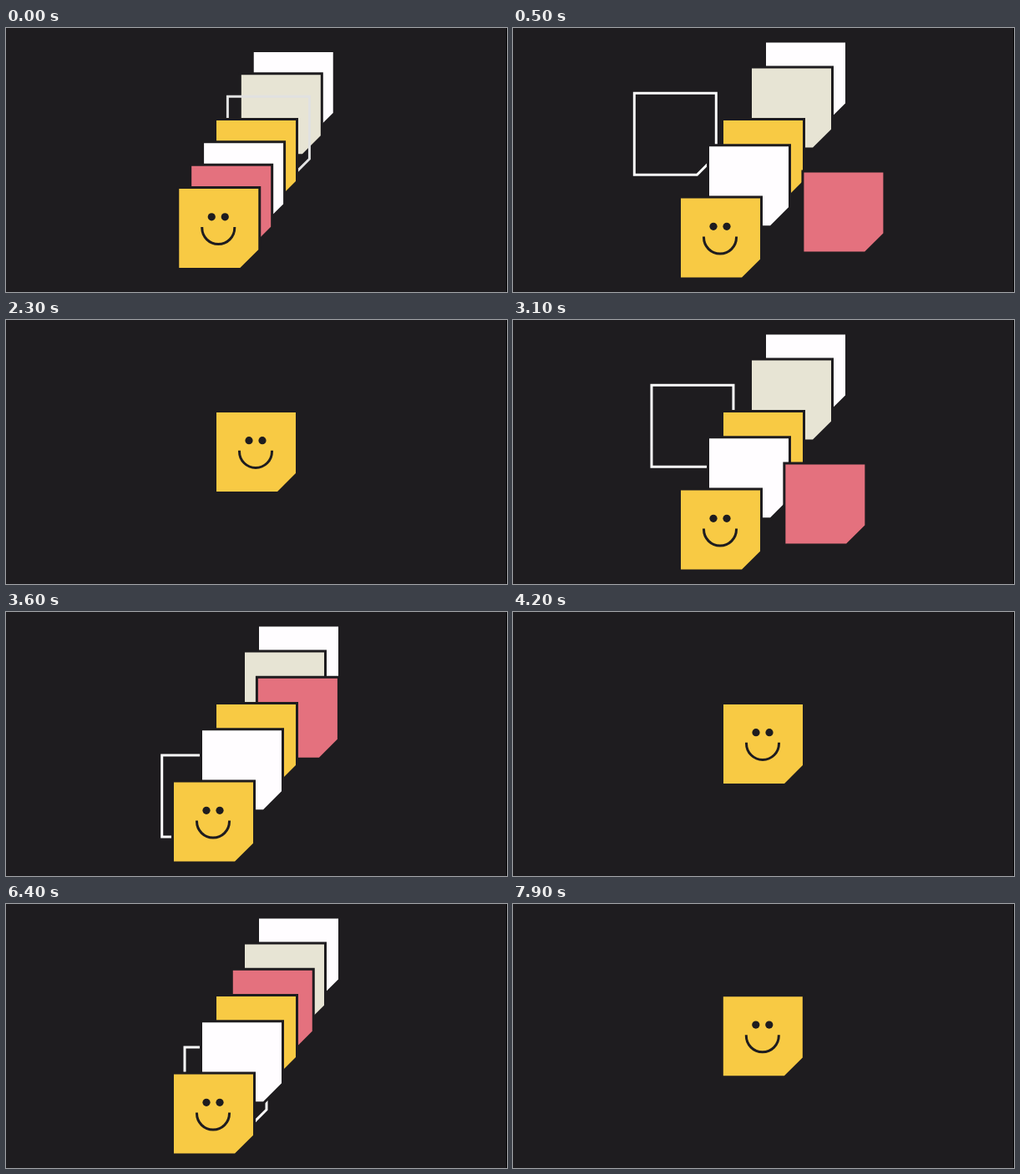
An HTML page with a canvas for the animation above (8000 ms loop, 600 px wide and 317 px high).

```html
<!DOCTYPE html>
<html lang="en">
<head>
<meta charset="utf-8">
<title>Sticky notes</title>
<style>
  html, body { margin: 0; width: 100%; height: 100%; overflow: hidden; background: #1e1c1f; }
  canvas { display: block; width: 600px; height: 317px; }
</style>
</head>
<body>
<canvas id="stage" width="600" height="317"></canvas>
<script>
const ctx = document.getElementById('stage').getContext('2d');
const INK = '#1e1c1f', YELLOW = '#f8ca44', PINK = '#e4717e', BEIGE = '#e7e4d4', WHITE = '#fffdff';
const LOOP = 8000, TICK = 100, CYCLE = 2701, LEAD = 216;
const HOME = { x: 252, y: 111 }, STEP = { x: 17, y: -31.2 };

// Note outline, 1.5px outside the 95px paper, with a clipped corner
const notePath = new Path2D('M-1.5-1.5H96.5V73.6L73.6 96.5H-1.5Z');

const mix = (a, b, p) => a + (b - a) * p;

function bezier(x1, y1, x2, y2) {
  const at = (a, b, s) => 3 * a * s * (1 - s) ** 2 + 3 * b * s * s * (1 - s) + s ** 3;
  return x => {
    let lo = 0, hi = 1;
    for (let i = 0; i < 24; i++) {
      const mid = (lo + hi) / 2;
      if (at(x1, x2, mid) < x) lo = mid; else hi = mid;
    }
    return at(y1, y2, lo);
  };
}
const ease = bezier(.25, .1, .25, 1);
const easeInOut = bezier(.42, 0, .58, 1);

function progress(t, start, duration, curve = ease) {
  const u = (t - start) / duration;
  return u <= 0 ? 0 : u >= 1 ? 1 : curve(u);
}

function note(pos, fill, stroke = INK) {
  ctx.save();
  ctx.translate(pos.x, pos.y);
  ctx.lineWidth = 3;
  ctx.strokeStyle = stroke;
  if (fill) {
    ctx.fillStyle = fill;
    ctx.fill(notePath);
  }
  ctx.stroke(notePath);
  ctx.restore();
}

function face(pos) {
  ctx.save();
  ctx.translate(pos.x, pos.y);
  ctx.fillStyle = ctx.strokeStyle = INK;
  ctx.lineWidth = 3;
  for (const x of [39, 55]) {
    ctx.beginPath();
    ctx.arc(x, 33.7, 4.6, 0, Math.PI * 2);
    ctx.fill();
  }
  ctx.beginPath();
  ctx.moveTo(66.5, 45.8);
  ctx.arc(47, 47, 19.5, 0, Math.PI);
  ctx.lineTo(27.5, 45.8);
  ctx.stroke();
  ctx.restore();
}

function draw(t) {
  const open = progress(t, 10, 350) - progress(t, 1300, 400);
  const out = progress(t, 317, 700);
  const swap = progress(t, 720, 300, easeInOut);
  const back = progress(t, 1017, 250);

  const slot = k => ({ x: HOME.x + STEP.x * k * open, y: HOME.y + STEP.y * k * open });
  // Slide sideways, change height, slide into the other's slot
  const trade = (from, to, side) => ({
    x: mix(mix(slot(from).x, side, out), slot(to).x, back),
    y: mix(slot(from).y, slot(to).y, swap)
  });
  const pink = trade(-2, 1, 369);
  const frame = trade(1, -2, 127.5);
  const grey = Math.round(mix(30, 252, open));

  ctx.fillStyle = INK;
  ctx.fillRect(0, 0, 600, 317);
  note(slot(3), WHITE);
  note(slot(2), BEIGE);
  note(frame, null, `rgb(${grey},${grey},${grey})`);
  if (back > 0) note(pink, PINK);
  note(slot(0), YELLOW);
  note(slot(-1), WHITE);
  if (back === 0) note(pink, PINK);
  note(slot(-3), YELLOW);
  face(slot(-3));

  // Dark hairline on the right edge
  ctx.fillStyle = '#000';
  ctx.fillRect(599, 0, 1, 317);
}

const began = performance.now();
function tick() {
  const now = Math.max(0, performance.now() - began) % LOOP;
  draw((Math.floor(now / TICK) * TICK + LEAD) % CYCLE);
  requestAnimationFrame(tick);
}
tick();
</script>
</body>
</html>
```
